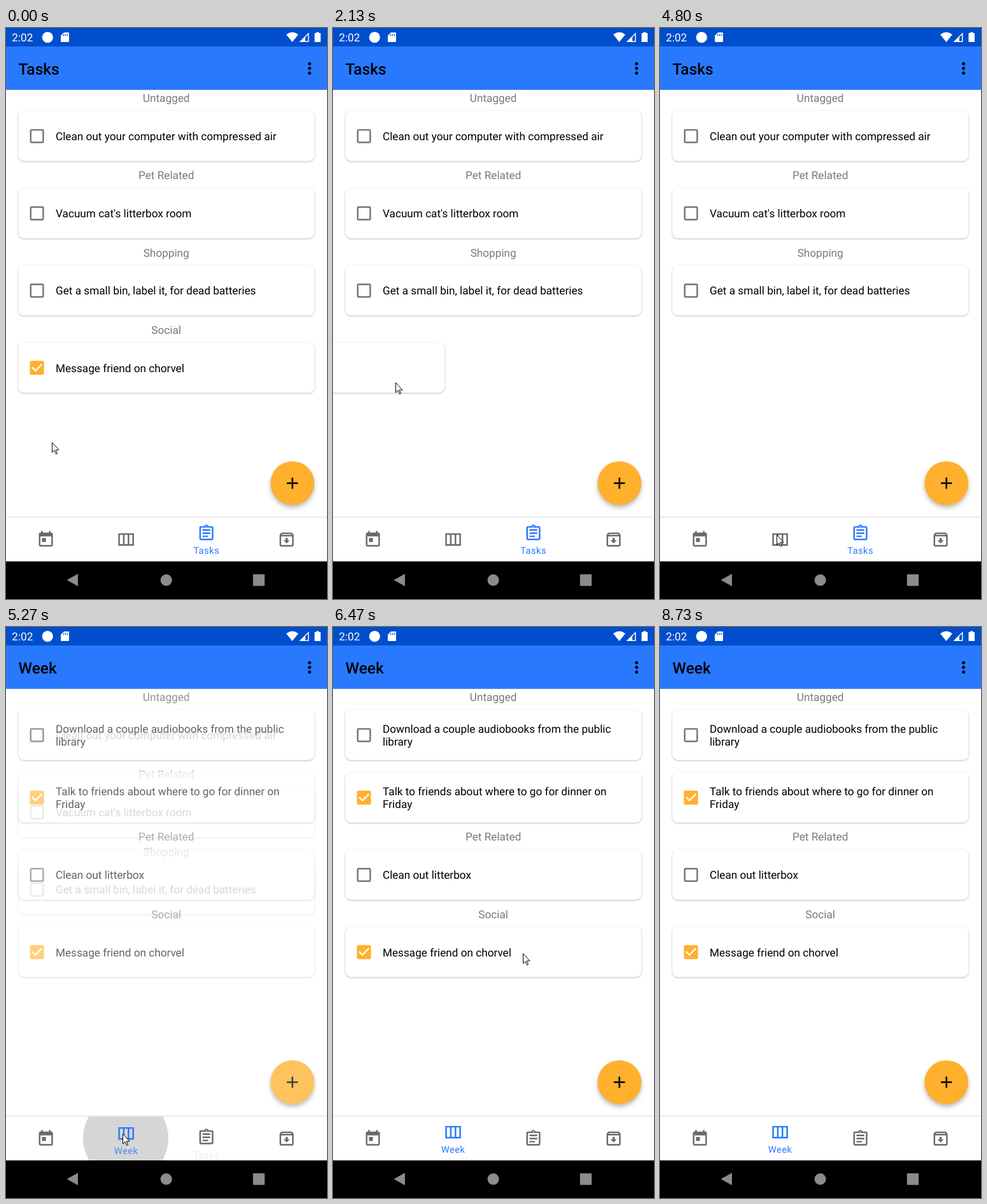
Recreate the animation shown at these times as an HTML page. Size 504 by 896 pixels, loop 9.27 s.

```html
<!DOCTYPE html>
<html lang="en">
<head>
<meta charset="utf-8">
<title>Tasks</title>
<style>
  html, body { margin: 0; width: 100%; height: 100%; overflow: hidden; background: #fff; }
  svg { display: block; width: 100%; height: 100%; }
  text { font: 17.18px Roboto, sans-serif; text-rendering: geometricPrecision; }
  .mid { text-anchor: middle; }
  .header { fill: #7a7a7a; }
  .title { font-size: 24.5px; font-weight: 500; }
  .label { font-size: 14.7px; letter-spacing: .03em; fill: #2979ff; }
  .card { fill: #fff; filter: drop-shadow(0 1.3px 1.5px rgba(0,0,0,.27)); }
  .fab { fill: #ffb02c; filter: drop-shadow(0 4px 3.5px rgba(0,0,0,.27)); }
  .nav { fill: #fff; filter: drop-shadow(0 -.5px .8px rgba(0,0,0,.16)); }
  .bar { fill: #2979ff; filter: drop-shadow(0 .5px .8px rgba(0,0,0,.2)); }
</style>
</head>
<body>
<svg id="stage" viewBox="0 0 504 896" xmlns="http://www.w3.org/2000/svg"></svg>
<script>
const FPS = 15, LOOP = 9270;
const DP = 504 / 410.7;          // pixels per density-independent unit
const TAP = 78;                  // step at which the Week tab is pressed

const tasks = [
  ['Untagged', ['Clean out your computer with compressed air']],
  ['Pet Related', ["Vacuum cat's litterbox room"]],
  ['Shopping', ['Get a small bin, label it, for dead batteries']],
  ['Social', ['Message friend on chorvel'], true],
];
const week = [
  ['Untagged', ['Download a couple audiobooks from the public', 'library']],
  ['', ['Talk to friends about where to go for dinner on', 'Friday'], true],
  ['Pet Related', ['Clean out litterbox']],
  ['Social', ['Message friend on chorvel'], true],
];

// 24-unit icons
const BOX = '<rect x="4" y="4" width="16" height="16" rx="1" fill="none" stroke="#757575" stroke-width="2"/>';
const CHECKED = '<rect x="3" y="3" width="18" height="18" rx="2" fill="#ffb02c"/>' +
  '<path fill="#fff" d="M10 17l-5-5 1.41-1.41L10 14.17l7.59-7.59L19 8z"/>';
const tabIcons = [
  '<path d="M19 3h-1V1h-2v2H8V1H6v2H5a2 2 0 0 0-2 2v14a2 2 0 0 0 2 2h14a2 2 0 0 0 2-2V5a2 2 0 0 0-2-2zm0 16H5V8h14zM7 10h5v5H7z"/>',
  '<path fill-rule="evenodd" d="M2 4h20v16H2zM4 6v12h4V6zM10 6v12h4V6zM16 6v12h4V6z"/>',
  '<path fill-rule="evenodd" d="M7 15h7v2H7zM7 11h10v2H7zM7 7h10v2H7zM19 3h-4.2a3 3 0 0 0-5.6 0H5a2 2 0 0 0-2 2v14a2 2 0 0 0 2 2h14a2 2 0 0 0 2-2V5a2 2 0 0 0-2-2zM12 2.75a.75.75 0 0 1 0 1.5.75.75 0 0 1 0-1.5zM19 19H5V5h14z"/>',
  '<path fill-rule="evenodd" d="M20.54 5.23l-1.39-1.68A1.45 1.45 0 0 0 18 3H6c-.47 0-.88.21-1.16.55L3.46 5.23A2 2 0 0 0 3 6.5V19a2 2 0 0 0 2 2h14a2 2 0 0 0 2-2V6.5c0-.48-.17-.93-.46-1.27zM6.24 5h11.52l.83 1H5.42zM5 19V8h14v11zM13.45 10h-2.9v3H8l4 4 4-4h-2.55z"/>',
];

const icon = (x, y, body) =>
  `<g transform="translate(${x - 12 * DP} ${y - 12 * DP}) scale(${DP})">${body}</g>`;
const text = (x, y, str, cls = '') => `<text x="${x}" y="${y}" class="${cls}">${str}</text>`;

function page(id, items) {
  let bottom = 87.5;
  const cards = items.map(([header, lines, done], i) => {
    const top = bottom + (header ? 42.5 : 19.4), mid = top + 39.7;
    bottom = top + 78.7;
    return `<g id="${id}${i}">
      ${header ? text(251.7, top - 13.9, header, 'mid header') : ''}
      <rect class="card" x="19.3" y="${top}" width="465" height="78.7" rx="9"/>
      ${icon(48.6, mid, done ? CHECKED : BOX)}
      ${lines.map((l, k) => text(78, mid + 6.3 + 20 * (k - (lines.length - 1) / 2), l)).join('')}
    </g>`;
  });
  return `<g id="${id}">${cards.join('')}
    <circle class="fab" cx="449.7" cy="714.3" r="34.4"/>
    <path d="M441 714.3h17.4m-8.7-8.7v17.4" stroke="#000" stroke-width="2.5"/></g>`;
}

const tabX = i => 62.6 + 126 * i;
const $ = id => document.getElementById(id);

$('stage').innerHTML = `
  <clipPath id="navClip"><path d="M0 768.5h504V837H0z"/></clipPath>
  <rect width="504" height="896" fill="#fff"/>
  ${page('tasks', tasks)}
  ${page('week', week)}
  <rect class="bar" y="29" width="504" height="68"/>
  <rect width="504" height="29" fill="#004ecb"/>
  <g fill="#fff">
    ${text(9.3, 20.8, '2:02')}
    <circle cx="65.3" cy="14.7" r="8.6"/>
    <path d="M91 7h7a1 1 0 0 1 1 1v13a1 1 0 0 1-1 1H87a1 1 0 0 1-1-1V12z"/>
    <path d="M90.5 9.5v3m3-3v3m3-3v3" stroke="#004ecb" stroke-width="1.3"/>
    <path d="M440 10.2Q449.5 2.8 459 10.2L449.5 22z"/>
    <path d="M460.5 22L475.5 7v15z"/>
    <path d="M470 14.5l4-4v10h-4z" fill="#004ecb"/>
    <path d="M487 6.5h4.5V8h2.5v14h-9.500V8h2.500z"/>
  </g>
  <text id="title" class="title" x="19.5" y="72.5"></text>
  ${[-1, 0, 1].map(k => `<circle cx="476.6" cy="${63.3 + 7.36 * k}" r="2.5"/>`).join('')}
  <rect class="nav" y="768.5" width="504" height="69"/>
  <circle id="ripple" cx="188" cy="802" clip-path="url(#navClip)"/>
  ${tabIcons.map((body, i) => `<g id="tab${i}" fill="#6a6a6a">${icon(tabX(i), 802.7, body)}</g>`).join('')}
  ${text(tabX(1), 824.7, 'Week', 'mid label').replace('<text', '<text id="label1"')}
  ${text(tabX(2), 824.7, 'Tasks', 'mid label').replace('<text', '<text id="label2"')}
  <rect y="837" width="504" height="59"/>
  <g fill="#8b8b8b">
    <path d="M95.500 866.300L113 856.500v19.600z"/>
    <circle cx="251.600" cy="866.300" r="9"/>
    <rect x="387.800" y="857.200" width="18.300" height="18.300" rx="1"/>
  </g>
  <path id="cursor" d="M.5.500v15.500l3.500-3.300 2.600 5.800 2-.9-2.500-5.600h5z" fill="#fff" stroke="#000"/>`;

// Pointer path: step, x, y
const path = [
  [0, 72, 650], [14, 72, 650], [23, 361, 531], [28, 361, 531], [33, 67, 559], [37, 67, 559],
  [44, 199, 562], [57, 199, 562], [63, 201, 650], [71, 184, 793], [72, 183, 795], [83, 183, 795],
  [87, 208, 670], [91, 247, 561], [97, 298, 512], [119, 298, 512], [131, 70, 897], [139, 50, 1100],
];
const clamp = v => Math.min(1, Math.max(0, v));
const smooth = p => p * p * (3 - 2 * p);

// Monotone cubic through the pointer path
function along(n, axis) {
  const i = Math.max(0, path.findIndex(k => k[0] > n) - 1);
  const slope = j => path[j] && path[j + 1]
    ? (path[j + 1][axis] - path[j][axis]) / (path[j + 1][0] - path[j][0]) : 0;
  const tangent = j => {
    const a = slope(j - 1), b = slope(j);
    return a * b > 0 ? 2 * a * b / (a + b) : 0;
  };
  const from = path[i], to = path[i + 1], span = to[0] - from[0];
  const p = (n - from[0]) / span, q = 1 - p, s = smooth(p);
  return from[axis] * (1 - s) + to[axis] * s +
    span * p * q * (q * tangent(i) - p * tangent(i + 1));
}

const set = (id, attrs) => {
  for (const name in attrs) $(id).setAttribute(name, attrs[name]);
};

function draw(time) {
  const n = Math.min(138, Math.floor((time % LOOP + 4) * FPS / 1000));
  const onWeek = n >= TAP;

  set('cursor', { transform: `translate(${Math.round(along(n, 1))} ${Math.round(along(n, 2))})` });

  // last task is swiped away
  set('tasks3', {
    transform: `translate(${-510 * smooth(clamp((n - 28) / 7))} 0)`,
    visibility: n < 35 ? 'visible' : 'hidden',
  });

  // cross-fade between the pages
  const enter = clamp((n - TAP + .4) / 2.3);
  set('week', { opacity: enter });
  set('tasks', { opacity: 1 - enter });
  $('title').textContent = onWeek ? 'Week' : 'Tasks';

  // bottom tabs
  const shift = clamp((n - TAP + .6) / 2);
  [[1, shift, onWeek], [2, 1 - shift, !onWeek]].forEach(([i, up, active]) => {
    set('tab' + i, { transform: `translate(0 ${-10 * up})`, fill: active ? '#2979ff' : '#6a6a6a' });
    set('label' + i, { transform: `translate(0 ${10 * (1 - up)})`, opacity: active ? up : up * .6 });
    $('label' + i).style.fill = active ? '#2979ff' : '#6a6a6a';
  });
  set('ripple', {
    r: Math.min(72, 40 + 27 * (n - TAP)) * onWeek,
    opacity: .16 * (1 - clamp((n - TAP - 2) / 6)),
  });
}

function tick() {
  draw(performance.now());
  requestAnimationFrame(tick);
}
tick();
</script>
</body>
</html>
```
